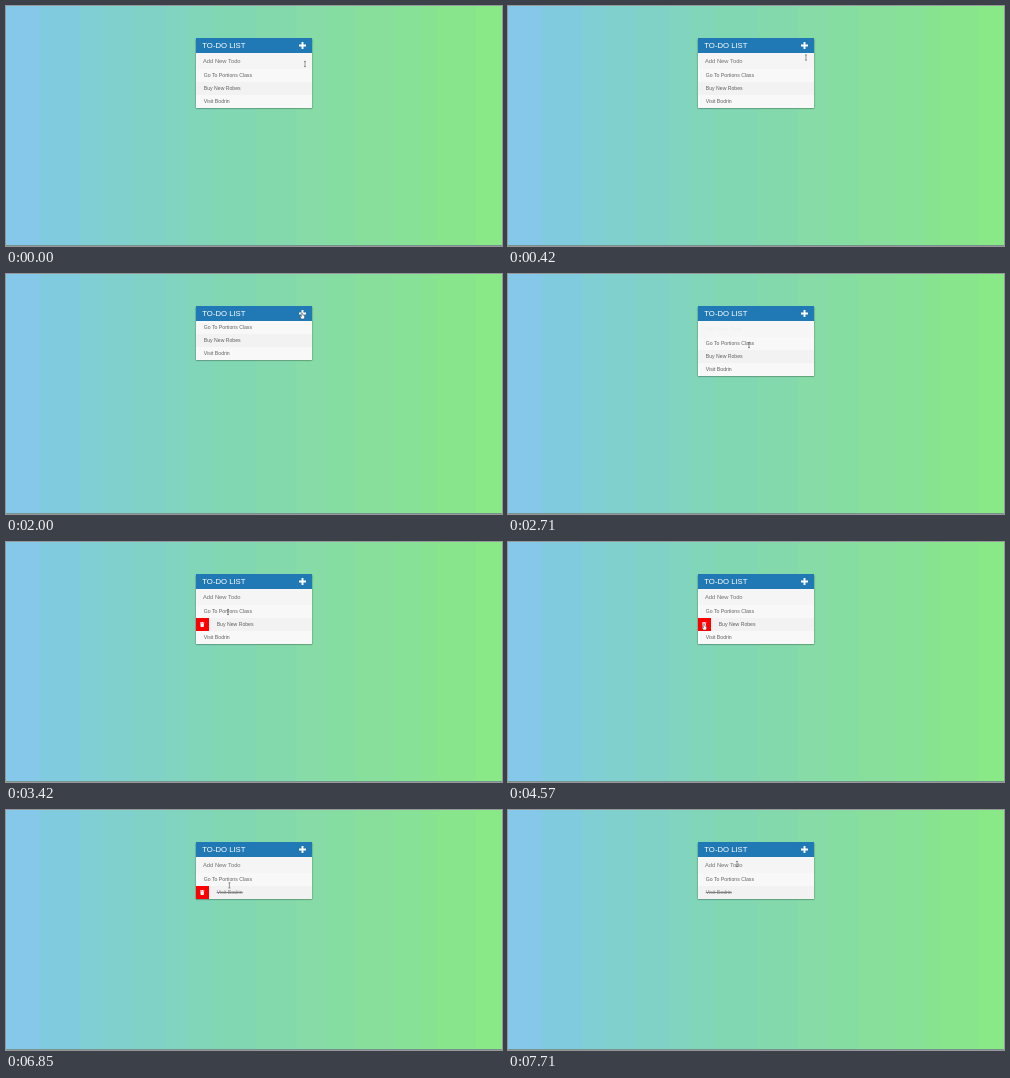
Animation, 496 px wide and 240 px high, one loop 8000 ms. Source, as an HTML page:

```html
<!DOCTYPE html>
<html lang="en">
<head>
<meta charset="utf-8">
<title>To-Do List</title>
<style>
html, body { margin: 0; width: 100%; height: 100%; overflow: hidden; }
body {
  position: relative;
  font-family: "Liberation Sans", Arial, sans-serif;
  background: linear-gradient(90deg,
    #85c8ea 0 34px, #81cbde 34px 74px, #80cfd5 74px 97px, #80d1ce 97px 128px,
    #80d2c7 128px 160px, #80d4c0 160px 182px, #81d5b9 182px 208px,
    #82d7b3 208px 250px, #84d9ac 250px 290px, #86dba6 290px 322px,
    #86dda1 322px 350px, #87df9b 350px 388px, #87e196 388px 416px,
    #88e390 416px 432px, #88e58c 432px 470px, #88e986 470px);
}
body::after { content: ""; position: absolute; left: 0; right: 0; bottom: 0; height: 1px; background: #76918c; }
#card {
  position: absolute; left: 190px; top: 32px; width: 116px;
  background: #f7f7f7; box-shadow: 0 .6px 1.5px rgba(0, 0, 0, .65);
}
h1 { margin: 0; height: 15px; padding-left: 6.3px; font: 7.73px/15px "Liberation Sans", Arial, sans-serif; color: #fff; background: #2079b4; }
#plus { position: absolute; left: 103px; top: 4px; width: 7px; height: 7px; }
#entry { height: 16px; padding-left: 7px; font-size: 5.8px; line-height: 16px; color: #707070; background: #f5f5f5; }
.row { display: flex; height: 12.88px; font-size: 5.15px; line-height: 12.88px; color: #606060; background: #f8f8f8; white-space: nowrap; }
.row.even { background: #f2f2f2; }
.row b { width: 0; background: #f00; overflow: hidden; display: flex; justify-content: center; align-items: center; }
.row b svg { flex: none; width: 4.4px; height: 5px; }
.row span { margin-left: 7.8px; }
.done span { color: #808080; text-decoration: line-through; }
#cursor { position: absolute; left: 0; top: 0; width: 8px; height: 8px; overflow: visible; }
</style>
</head>
<body>
<div id="card">
  <h1>TO-DO LIST</h1>
  <svg id="plus" viewBox="0 0 7 7"><path d="M3.5 0V7M0 3.5H7" stroke="#fff" stroke-width="1.9"/></svg>
  <div id="entry">Add New Todo</div>
  <div id="list"></div>
</div>
<svg id="cursor" viewBox="0 0 8 8">
  <path id="beam" d="M-1-2.6H1M0-2.6V2.6M-1 2.6H1" fill="none" stroke="#555" stroke-width=".6"/>
  <path id="hand" d="M-.6 0Q0-.7.6 0V2L2.6 2.6V4.4L2 6H-.7L-2 3.6L-1.5 3L-.6 3.8Z" fill="#fff" stroke="#333" stroke-width=".45"/>
</svg>
<script>
const $ = id => document.getElementById(id);
const trash = '<svg viewBox="0 0 9 10"><path d="M0 1H3V0H6V1H9V2.3H0ZM.8 3H8.2L7.6 10H1.4Z" fill="#fff"/></svg>';
const rows = ["Go To Portions Class", "Buy New Robes", "Visit Bodrin"].map(text => {
  const row = document.createElement("div");
  row.className = "row";
  row.innerHTML = `<b>${trash}</b><span>${text}</span>`;
  $("list").append(row);
  return row;
});

// time, x, y of the pointer
const path = [
  [0, 299, 58], [140, 299, 58], [850, 296, 39], [2430, 296, 39], [2710, 241, 71],
  [3060, 238, 76], [3260, 230, 81], [3420, 222, 70], [3570, 222, 70], [4150, 196, 82],
  [5690, 196, 82], [5850, 219, 82], [6570, 219, 82], [7000, 225, 73], [7570, 229, 54], [8000, 229, 54]
];

const ramp = (t, start, length) => Math.min(1, Math.max(0, (t - start) / length));
const swing = p => .5 - Math.cos(p * Math.PI) / 2;
const fade = (t, start, length) => swing(ramp(t, start, length));
const hover = (t, on, off) => ramp(t, on, 200) - ramp(t, off, 200);

function pointer(t) {
  const i = path.findIndex(p => p[0] > t);
  const [t0, x0, y0] = path[i - 1], [t1, x1, y1] = path[i];
  const p = fade(t, t0, t1 - t0);
  const x = x0 + (x1 - x0) * p, y = y0 + (y1 - y0) * p;
  const hand = y < 47 || x < 203;
  $("cursor").style.transform = `translate(${x}px, ${y}px)`;
  $("hand").style.display = hand ? "" : "none";
  $("beam").style.display = hand ? "none" : "";
}

function openTrash(row, amount) {
  const box = row.firstChild;
  box.style.width = 12.9 * amount + "px";
  box.style.opacity = amount;
}

function draw(now) {
  const t = now % 8000;
  const removed = t >= 5690;

  $("entry").style.opacity = 1 - fade(t, 1570, 420) + fade(t, 2650, 400);
  $("entry").style.display = t >= 1990 && t < 2650 ? "none" : "";

  openTrash(rows[0], hover(t, 2710, 3060) + hover(t, 6930, 7180));
  openTrash(rows[1], hover(t, 3060, 9000));
  openTrash(rows[2], hover(t, 5690, 6930));

  rows[1].style.opacity = 1 - fade(t, 5190, 500);
  rows[1].style.display = removed ? "none" : "";
  rows[1].classList.add("even");
  rows[2].classList.toggle("even", removed);
  rows[2].classList.toggle("done", t >= 6280);

  pointer(t);
  requestAnimationFrame(draw);
}
requestAnimationFrame(draw);
</script>
</body>
</html>
```
